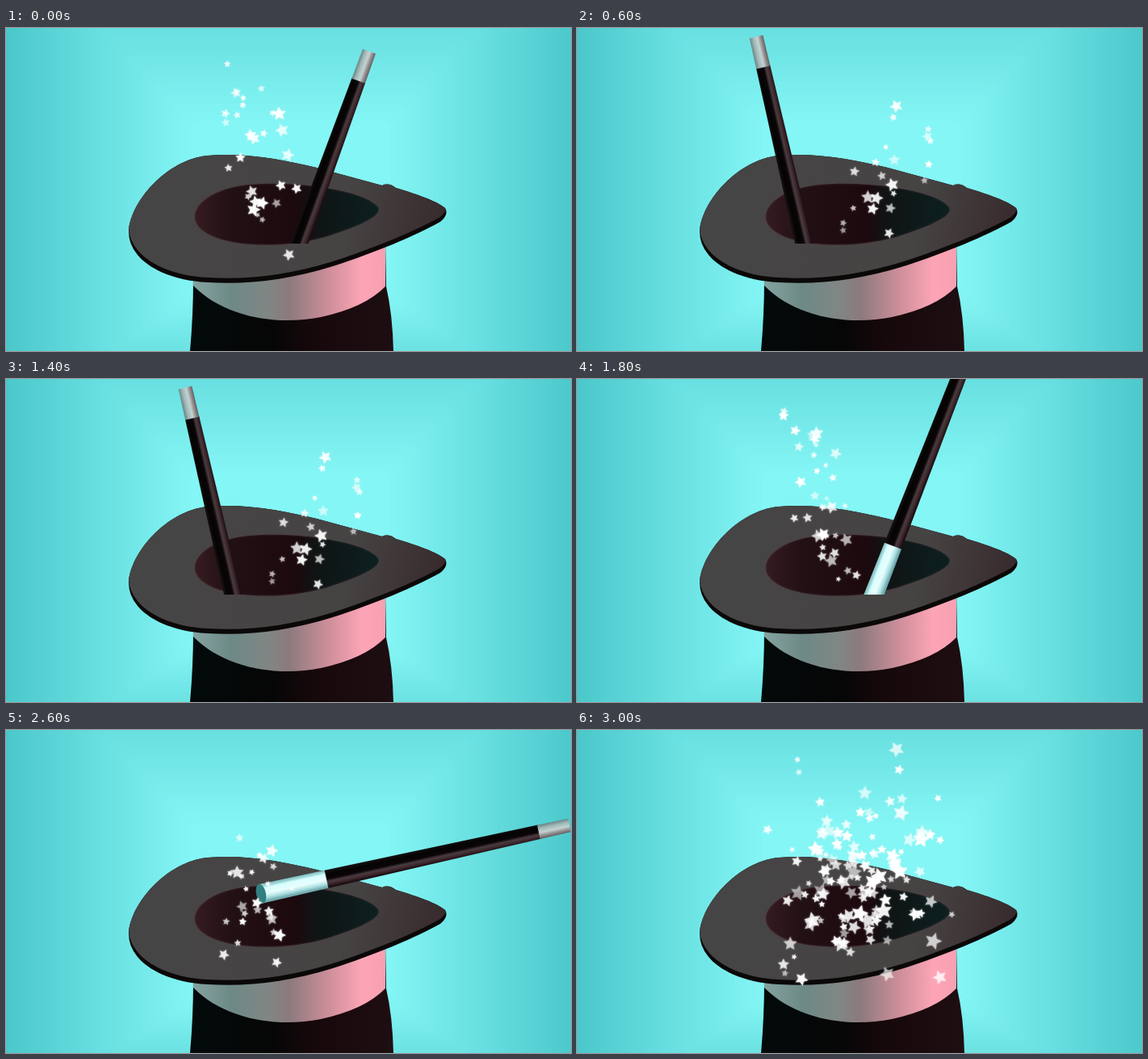
An HTML page with a canvas for the animation above (3.2 s loop, 700x400 px).

```html
<!DOCTYPE html>
<html lang="en">
<head>
<meta charset="utf-8">
<title>Magic hat</title>
<style>
html, body { margin: 0; width: 100%; height: 100%; overflow: hidden; background: #4cc6ca; }
canvas { display: block; }
</style>
</head>
<body>
<canvas id="stage" width="700" height="400"></canvas>
<script>
const ctx = document.getElementById('stage').getContext('2d');
const STEP = 200, LOOP = 3200;

const mix = (a, b, k) => a + (b - a) * k;
const ease = k => k * k * (3 - 2 * k);

function ramp(x0, y0, x1, y1, ...stops) {
  const g = ctx.createLinearGradient(x0, y0, x1, y1);
  stops.forEach(([at, color]) => g.addColorStop(at, color));
  return g;
}

function fill(path, color) {
  ctx.fillStyle = color;
  ctx.fill(path instanceof Path2D ? path : new Path2D(path));
}

function random(seed) {
  return () => {
    seed = (seed * 16807) % 2147483647;
    return seed / 2147483647;
  };
}

// Nested rectangles that brighten towards the middle.
function background() {
  for (let k = 0; k <= 1; k += .025) {
    const x = mix(-30, 235, k), y = mix(-154, 121, k);
    ctx.fillStyle = `rgb(${mix(68, 134, k)},${mix(194, 247, k)},${mix(198, 246, k)})`;
    ctx.beginPath();
    ctx.roundRect(x, y, 705 - 2 * x, mix(510, 330, k) - y, 12);
    ctx.fill();
  }
}

const brim = new Path2D('M152 252C154 216 198 163 250 158C300 154 345 164 385 173L466 195' +
  'Q474 191 483 198C510 206 535 215 544 223Q549 231 538 240C508 257 455 279 405 295' +
  'C350 312 300 318 250 315C205 313 175 296 163 281Q152 268 152 252Z');
const opening = new Path2D('M234 236C232 216 260 198 300 194C350 190 395 196 425 204' +
  'C448 210 462 219 462 225C461 236 430 248 395 259C365 267 335 270 305 268' +
  'C265 266 236 253 234 236Z');

function hat() {
  fill('M232 310L470 265L471 320Q479 355 480 400H228Q232 355 232 310Z',
    ramp(228, 0, 480, 0, [0, '#030a0a'], [.4, '#060606'], [.6, '#16080b'], [1, '#1e0e12']));
  fill('M232 300L470 255V320Q445 346 390 358C335 369 270 358 232 319Z',
    ramp(232, 0, 470, 0, [0, '#84a3a0'], [.2, '#6d8986'], [.38, '#7f8785'],
      [.5, '#8c7a7d'], [.7, '#cc8e99'], [.88, '#fda5b6'], [1, '#f7a0b2']));
  fill(brim, '#0b0808');
  ctx.save();
  ctx.clip(brim);
  ctx.translate(0, -6);
  fill(brim, ramp(160, 180, 540, 260, [0, '#464545'], [.7, '#464343'], [1, '#382a2c']));
  ctx.restore();
  fill(opening, ramp(234, 0, 462, 0, [0, '#351b20'], [.2, '#211014'], [.55, '#1c090e'],
    [.65, '#101314'], [1, '#0c2020']));
  ctx.strokeStyle = '#5a40442e';
  ctx.lineWidth = 3;
  ctx.stroke(opening);
}

// Near end at (x0, y0), far end at (x1, y1); the near end may carry a white tip.
function wand(x0, y0, x1, y1, tip) {
  const len = Math.hypot(x1 - x0, y1 - y0), near = tip ? 12 : 11, far = 8.5;
  const part = (a, b, ...stops) => {
    const p = mix(near, far, a / len), q = mix(near, far, b / len);
    fill(`M${a} ${-p}L${b} ${-q}L${b} ${q}L${a} ${p}Z`, ramp(0, -10, 0, 10, ...stops));
  };
  ctx.save();
  ctx.beginPath();
  ctx.rect(0, 0, 700, 267);
  ctx.clip();
  ctx.translate(x0, y0);
  ctx.rotate(Math.atan2(y1 - y0, x1 - x0));
  part(0, len - 38, [0, '#151011'], [.2, '#050303'], [.5, '#0b0607'],
    [.66, '#4a3c40'], [.82, '#3d282d'], [1, '#1b0d11']);
  part(len - 39, len, [0, '#5d7675'], [.3, '#a0b9b8'], [.55, '#c4d2d2'],
    [.75, '#918e8f'], [1, '#564b4e']);
  if (tip) {
    part(0, 84, [0, '#8cc8ca'], [.2, '#d9ffff'], [.55, '#e8fcfc'], [.8, '#a9dfe1'], [1, '#6fa9ad']);
    ctx.beginPath();
    ctx.ellipse(1, 0, 6, near, 0, 0, 7);
    ctx.fillStyle = '#327e80';
    ctx.fill();
  }
  ctx.restore();
}

function star(x, y, r, turn, alpha) {
  ctx.globalAlpha = alpha;
  ctx.beginPath();
  for (let i = 0; i < 10; i++) {
    const a = i * Math.PI / 5 - Math.PI / 2 + turn, d = i % 2 ? r * .48 : r;
    ctx.lineTo(x + d * Math.cos(a), y + d * Math.sin(a));
  }
  ctx.fill();
}

// Stars strewn around a bent trail that rises from the hat.
function trail(seed, count, [x0, y0], [x1, y1], [x2, y2], spread, size = 8) {
  const rnd = random(seed * 7919), bell = () => (rnd() + rnd() + rnd() - 1.5) * spread;
  const bend = (a, b, c, k) => mix(mix(a, b, k), mix(b, c, k), k);
  ctx.save();
  ctx.fillStyle = ctx.shadowColor = '#fff';
  ctx.shadowBlur = 2;
  for (let i = 0; i < count; i++) {
    const k = (i + rnd()) / count;
    star(bend(x0, x1, x2, k) + bell(), bend(y0, y1, y2, k) + bell() * .6,
      size * mix(.4, 1.1, rnd()), rnd() - .5, mix(.35, .95, rnd()));
  }
  ctx.restore();
}

// Four swings of the wand, its far end on a shallow arc.
function swing(n) {
  const x = mix(450, 222, ease(n / 3));
  wand(358 - 24.5 * n, 281, x, 2 + ((x - 305) / 28) ** 2);
}

const poses = {
  right() {
    swing(0);
    trail(3, 29, [325, 255], [325, 150], [270, 60], 50);
  },
  middle() {
    swing(1);
    trail(5, 32, [315, 235], [215, 210], [195, 95], 42);
  },
  upright() {
    swing(2);
    trail(8, 26, [320, 245], [300, 170], [310, 100], 55);
  },
  left() {
    swing(3);
    trail(11, 22, [365, 255], [375, 190], [430, 100], 45);
  },
  dip() {
    wand(361, 285, 502, -77, true);
    trail(14, 33, [315, 252], [330, 150], [265, 45], 38);
  },
  lift() {
    wand(340, 232, 588, -60, true);
    trail(17, 28, [315, 245], [310, 170], [290, 110], 50);
  },
  tap() {
    wand(315, 203, 698, 118, true);
    trail(20, 26, [320, 255], [325, 215], [320, 155], 65);
  },
  raise() {
    wand(335, 185, 695, 52, true);
    trail(23, 26, [320, 255], [325, 215], [320, 160], 60);
  },
  burst() {
    trail(26, 75, [355, 245], [355, 190], [345, 125], 70, 10);
    trail(29, 55, [350, 300], [355, 190], [350, 70], 130, 9);
  }
};
const cycle = ['right', 'middle', 'upright', 'left'];
const order = [...cycle, ...cycle, 'right', 'dip', 'lift', 'tap', 'raise', 'tap', 'raise', 'burst'];

function draw() {
  background();
  hat();
  poses[order[Math.floor(performance.now() % LOOP / STEP)]]();
  requestAnimationFrame(draw);
}
draw();
</script>
</body>
</html>
```
